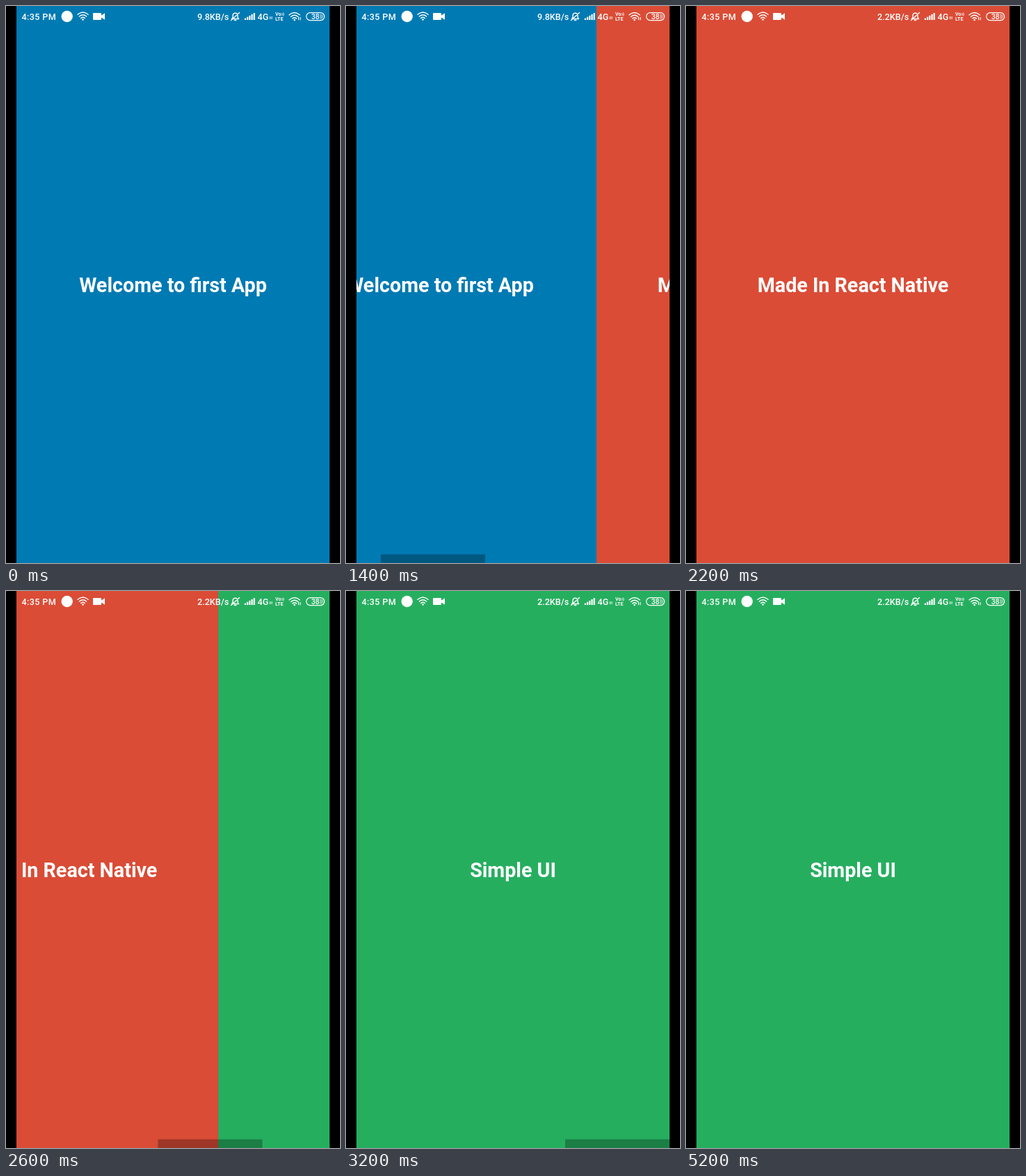
These frames come from a looping animation (480 by 800 pixels, 5.3 s). An HTML page:

```html
<!DOCTYPE html>
<html lang="en">
<head>
<meta charset="utf-8">
<title>Welcome screens</title>
<style>
  html, body { margin: 0; width: 100%; height: 100%; overflow: hidden; background: #000; }
  svg { display: block; }
  text { font-family: Roboto, sans-serif; fill: #fff; }
  .title { font-size: 28.7px; font-weight: 700; text-anchor: middle; }
  .status { font-size: 12.6px; font-weight: 500; }
  .tiny { font-size: 7px; font-weight: 700; }
  .line { fill: none; stroke: #fff; stroke-width: 1.4; stroke-linecap: round; stroke-linejoin: round; }
</style>
</head>
<body>
<svg width="480" height="800" viewBox="0 0 480 800">
  <defs>
    <clipPath id="screen"><rect x="15" width="450" height="800"/></clipPath>
    <g id="wifi">
      <path class="line" d="M-7.6-7Q0-13.6 7.6-7M-5.2-4.3Q0-8.8 5.2-4.3M-2.9-1.8Q0-4.2 2.9-1.8"/>
      <circle r="1.3" cy=".2" fill="#fff"/>
    </g>
  </defs>
  <g clip-path="url(#screen)">
    <g id="pages"></g>
    <rect id="bar" y="787.5" width="150" height="13"/>
  </g>

  <g fill="#fff">
    <text class="status" x="22.6" y="19.8" letter-spacing=".35">4:35 PM</text>
    <circle cx="87.7" cy="15" r="8.2"/>
    <use href="#wifi" x="110.5" y="19.3"/>
    <path d="M126 10h10q1 0 1 1v2.6l5-3.4v9.6l-5-3.4V19q0 1-1 1h-10q-1 0-1-1v-8q0-1 1-1z"/>

    <text class="status" id="speed" x="275" y="19.8"></text>
    <path class="line" stroke-width="1.2" d="M324.5 18.5h10l-1.5-2.2v-3q-.4-3-3.5-3.2-3.2.2-3.5 3.2v3zM328.3 20.5h2.4M323.5 20.5L335.5 9.5"/>
    <g id="signal"></g>
    <text class="status" x="361.6" y="19.8">4G</text>
    <path d="M379.6 15v4M382 15v4" stroke="#fff" stroke-width="1"/>
    <text class="tiny" x="387" y="14">Vo</text>
    <path class="line" style="stroke-width:.9" d="M396.8 10.5q1 1.3 0 2.8M398.7 9.8q1.4 2 0 4.2"/>
    <text class="tiny" x="387" y="20.5">LTE</text>
    <use href="#wifi" x="414.6" y="19.8"/>
    <path d="M420.5 16v4.2M423 16v4.2" stroke="#fff" stroke-width="1.1"/>
    <rect class="line" style="stroke-width:1.2" x="431.6" y="9.6" width="26" height="11" rx="5.5"/>
    <path d="M451 11.4h1.5a3.7 3.7 0 0 1 0 7.4H451z" opacity=".4"/>
    <text x="444.6" y="18.9" font-size="10.5" font-weight="500" text-anchor="middle">38</text>
  </g>
</svg>
<script>
const LOOP = 5300, STEP = 100, PAGE = 450, LEFT = 15;
const $ = id => document.getElementById(id);

const pages = [
  ['#007ab3', 'Welcome to first App'],
  ['#da4c36', 'Made In React Native'],
  ['#26ae5f', 'Simple UI'],
];
$('pages').innerHTML = pages.map(([color, title], i) => `
  <rect x="${LEFT + i * PAGE}" width="${PAGE}" height="800" fill="${color}"/>
  <text class="title" x="${240 + i * PAGE}" y="411.3">${title}</text>`).join('');

$('signal').innerHTML = [0, 1, 2, 3, 4].map(i =>
  `<rect x="${342.8 + i * 3.2}" y="${17.6 - i * 1.9}" width="2.2" height="${2.4 + i * 1.9}"/>`).join('');

// Each swipe: start time, scroll offset per step, time the scroll bar has faded out.
const swipes = [
  { start: 1400, offsets: [105, 405, 449, 450], gone: 2200 },
  { start: 2500, offsets: [12, 160, 435, 450], gone: 3450 },
];

function draw(now) {
  const t = Math.floor(now % LOOP / STEP) * STEP;
  let scroll = 0, barAlpha = 0;
  for (const { start, offsets, gone } of swipes) {
    if (t < start) continue;
    scroll += offsets[Math.min((t - start) / STEP, offsets.length - 1)];
    barAlpha = Math.max(0, Math.min(1, (gone - t) / 250));
  }
  $('pages').setAttribute('transform', `translate(${-scroll} 0)`);
  $('bar').setAttribute('x', LEFT + scroll / pages.length);
  $('bar').setAttribute('fill-opacity', 0.28 * barAlpha);
  $('speed').textContent = t < 2000 ? '9.8KB/s' : '2.2KB/s';
}

const begin = performance.now();
function tick() {
  draw(performance.now() - begin);
  requestAnimationFrame(tick);
}
tick();
</script>
</body>
</html>
```
